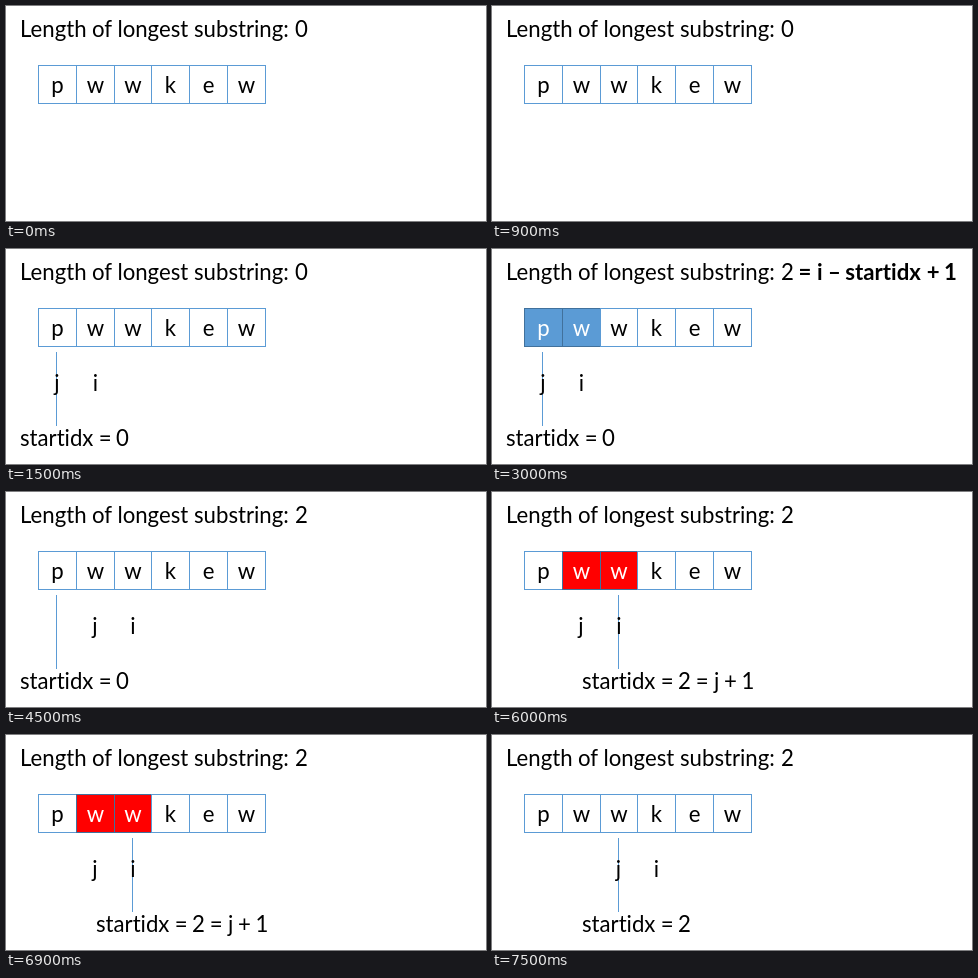
Animation of 480 by 215 pixels, one loop 8000 ms. Source, as an HTML page:

```html
<!DOCTYPE html>
<html lang="en">
<head>
<meta charset="utf-8">
<title>Longest substring</title>
<style>
html, body { margin: 0; width: 100%; height: 100%; overflow: hidden; background: #fff; }
svg { display: block; width: 480px; height: 215px; }
text { font: 22.2px Lato, sans-serif; font-variant-ligatures: none; white-space: pre; }
.bold { font-weight: 700; }
</style>
</head>
<body>
<svg id="stage" viewBox="0 0 480 215"></svg>
<script>
const stage = document.getElementById('stage');
const STEP = 1500, LOOP = 8000;
const BLUE = '#5b9bd5', DARK = '#41719c', RED = '#ff0000';
const TOP = 59.5, BOTTOM = 97.5;
const letters = [...'pwwkew'];
const edges = [32.5, 70.5, 108.5, 145.5, 183.5, 221.5, 259.5];

// j, i, start: cell indices; fill: [first, last, colour]
const steps = [
  { best: 0 },
  { best: 0, j: 0, i: 1, start: 0 },
  { best: 2, j: 0, i: 1, start: 0, fill: [0, 1, BLUE], formula: true },
  { best: 2, j: 1, i: 2, start: 0 },
  { best: 2, j: 1, i: 2, start: 2, fill: [1, 2, RED], sum: true },
  { best: 2, j: 2, i: 3, start: 2 }
];

const mid = k => (edges[k] + edges[k + 1]) / 2;

const text = (s, x, y, attrs = '') => `<text x="${x}" y="${y}" ${attrs}>${s}</text>`;

const centered = (s, x, y, color = '#000') =>
  text(s, x, y, `text-anchor="middle" fill="${color}"`);

// Places each word of a phrase at its own x.
const words = (phrase, xs, y, attrs) =>
  phrase.split(' ').map((w, n) => text(w, xs[n], y, attrs)).join('');

function title({ best, formula }) {
  let out = words(`Length of longest substring: ${best}`, [14, 86, 111.4, 188, 289], 31);
  if (formula) {
    out += words('= i – startidx + 1', [306.5, 325, 336, 353.3, 434.7, 452], 31, 'class="bold"');
  }
  return out;
}

// Cells overlap by one edge; each covers the right edge of the one before.
function cells({ fill: [first, last, color] = [] }) {
  return letters.map((c, k) => {
    const on = k >= first && k <= last;
    return `<rect x="${edges[k]}" y="${TOP}" width="${edges[k + 1] - edges[k]}"
      height="${BOTTOM - TOP}" fill="${on ? color : '#fff'}" stroke="${on ? DARK : BLUE}"/>` +
      centered(c, mid(k), 87, on ? '#fff' : '#000');
  }).join('');
}

function pointers({ j, i, start, sum }) {
  if (start === undefined) return '';
  const x = start ? 90 : 14;
  const label = `startidx = ${start}` + (sum ? ' = j + 1' : '');
  const xs = [0, 78.7, 96, 113.7, 132, 142, 159.5].map(d => x + d);
  const mark = start ? 126.5 : 50.5;
  return `<path d="M${mark} 103V177" stroke="${BLUE}"/>` +
    centered('j', mid(j) - 0.5, 142) + centered('i', mid(i), 142) +
    words(label, xs, 197);
}

let shown = -1;
function render(t) {
  const n = Math.floor((t % LOOP) / STEP);
  if (n === shown) return;
  shown = n;
  const s = steps[n];
  stage.innerHTML = title(s) + cells(s) + pointers(s);
}

const begin = performance.now();
function tick() {
  render(performance.now() - begin);
  requestAnimationFrame(tick);
}
tick();
</script>
</body>
</html>
```
